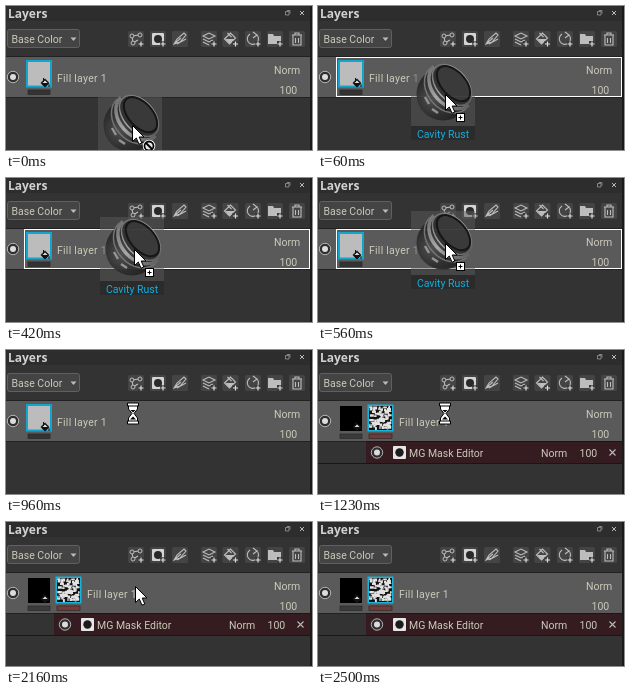
An HTML page for the animation above (2.89 s loop, 306 by 144 pixels).

```html
<!DOCTYPE html>
<html lang="en">
<head>
<meta charset="utf-8">
<title>Layers panel</title>
<style>
html, body { margin: 0; width: 100%; height: 100%; overflow: hidden; background: #333; }
svg { display: block; width: 100%; height: 100%; }
text { font: 10.5px Roboto, "Open Sans", sans-serif; fill: #cbc9ba; }
.title { font: bold 12px "Open Sans", "Noto Sans", sans-serif; fill: #d2d2d2; }
.name { letter-spacing: .25px; }
.drag { fill: #12aede; text-anchor: middle; }
.line { fill: none; stroke: #bdbdbd; stroke-width: 1.1; }
</style>
</head>
<body>
<svg viewBox="0 0 306 144">
  <defs>
    <radialGradient id="ball" cx=".3" cy=".6" r=".75">
      <stop offset="0" stop-color="#505050"/><stop offset=".45" stop-color="#2c2c2c"/><stop offset="1" stop-color="#171717"/>
    </radialGradient>
    <linearGradient id="rim">
      <stop offset="0" stop-color="#777"/><stop offset=".5" stop-color="#b0b0b0"/><stop offset="1" stop-color="#666"/>
    </linearGradient>
    <rect id="key" x="-8" y="-8" width="16" height="16" rx="1.5" fill="#444"/>
    <g id="plus">
      <rect x="2" y="2" width="6" height="6" fill="#3a3a3a"/>
      <path d="M5 2.5v5M2.5 5h5" stroke="#ddd" stroke-width="1.2"/>
    </g>
    <g id="eye">
      <circle r="5.7" fill="#2e2e2e" stroke="#b4b4b4"/>
      <circle r="3" fill="#dcdcdc"/>
    </g>
    <g id="bucket">
      <path d="M-3.5 0L0-3.5L3.5 0L0 3.5Z" fill="#ddd" stroke="#111" stroke-width="1.3"/>
      <path d="M-3 .5H3L0 3.5ZM-1.5-5V-1M4 1v3" fill="#111" stroke="#111"/>
    </g>
  </defs>

  <rect width="306" height="144" fill="#333"/>
  <rect width="306" height="15" fill="#2d2d2d"/>
  <text class="title" x="2" y="12">Layers</text>
  <path d="M279.5 5.5h3.5v3.5h-3.5zM281 4.5h3v3" fill="none" stroke="#999" stroke-width=".8"/>
  <path d="M294 5l4 4m0-4l-4 4" stroke="#bbb"/>

  <rect x="1.5" y="23.5" width="72" height="18" rx="2" fill="#444" stroke="#606060"/>
  <text x="5.5" y="36.5">Base Color</text>
  <path d="M64.5 31.5h6l-3 3.5z" fill="#bbb"/>

  <g id="tools" transform="translate(0 33)">
    <g transform="translate(130)">
      <use href="#key"/>
      <path class="line" d="M-4-3L3-4M-4-3L-3 4M-3 4L2 1"/>
      <g fill="#444" stroke="#bdbdbd"><circle cx="-4" cy="-3" r="2"/><circle cx="4" cy="-4" r="2"/><circle cx="-3" cy="4" r="2"/></g>
      <use href="#plus"/>
    </g>
    <g transform="translate(152)">
      <use href="#key"/>
      <rect x="-6" y="-6" width="12" height="12" rx="1" fill="#d4d4d4"/>
      <circle r="4" fill="#292929"/><use href="#plus"/>
    </g>
    <g transform="translate(174)">
      <use href="#key"/>
      <path class="line" d="M-6 5L-3 0L4-6L6-4L0 3ZM-3 5L6 0M-6 5L1-1"/>
    </g>
    <g transform="translate(203)">
      <use href="#key"/>
      <path class="line" d="M-6-3L0-6L6-3L0 0ZM-6 0L0 3L4 1M-6 3L0 6"/><use href="#plus"/>
    </g>
    <g transform="translate(224.5)">
      <use href="#key"/>
      <path class="line" d="M-6 0L0-6L5-1L-1 5ZM-3-6L1-2"/>
      <path d="M-5 0H4L-1 5Z" fill="#bdbdbd"/><use href="#plus"/>
    </g>
    <g transform="translate(247)">
      <use href="#key"/>
      <path class="line" d="M-3-5A5.6 5.6 0 1 0 4-4M0-7L4-4L0-1"/><use href="#plus"/>
    </g>
    <g transform="translate(269)">
      <use href="#key"/>
      <path d="M-7-5h5l1 2h7v8h-13z" fill="#bdbdbd"/><use href="#plus"/>
    </g>
    <g transform="translate(291)">
      <use href="#key"/>
      <path class="line" d="M-5-4H5M-2-4V-6H2V-4M-4-4V6H4V-4M-1.5-1V4M1.5-1V4"/>
    </g>
  </g>

  <rect y="50" width="306" height="1" fill="#222"/>
  <rect y="51" width="304" height="40" fill="#5a5a5a"/>
  <rect y="91" width="306" height="1" fill="#222"/>
  <use href="#eye" x="7" y="71"/>
  <text x="268" y="68">Norm</text>
  <text x="273.5" y="87.5">100</text>
  <text class="name" id="name" y="75.5">Fill layer 1</text>

  <g id="plain">
    <rect x="20" y="54" width="26" height="27.5" fill="#14a5cf"/>
    <rect x="22" y="56" width="22" height="23.5" fill="#bcbcbc"/>
    <use href="#bucket" x="39" y="77"/>
    <rect x="22" y="84" width="22" height="4.5" fill="#333" stroke="#2a2a2a" stroke-width=".7"/>
  </g>

  <g id="masked">
    <rect x="22" y="56" width="22" height="25" fill="#000"/>
    <use href="#bucket" x="39" y="77"/>
    <rect x="22" y="84" width="22" height="4.5" fill="#3b3b3b" stroke="#2a2a2a" stroke-width=".7"/>
    <rect x="49.5" y="54.5" width="26" height="27" fill="#14b4dc"/>
    <rect x="51" y="56" width="23" height="24" fill="#111"/>
    <path id="grunge" fill="#e2e2e2"/>
    <rect x="51" y="84" width="23" height="4.5" fill="#743a3a" stroke="#2a2a2a" stroke-width=".7"/>
    <rect y="92" width="304" height="21" fill="#333"/>
    <rect x="48" y="92" width="256" height="21" fill="#341c20"/>
    <path d="M0 113.5H304M48 91.5H304" stroke="#1c1416"/>
    <use href="#eye" x="59" y="102.5"/>
    <rect x="75" y="96" width="13" height="13" rx="1" fill="#e6e6e6"/>
    <circle cx="81.5" cy="102.5" r="4.2" fill="#1c1c1c"/>
    <text x="91" y="106.5">MG Mask Editor</text>
    <text x="223" y="106.5">Norm</text>
    <text x="261.5" y="106.5">100</text>
    <path d="M291.5 99.5l6 6m0-6l-6 6" stroke="#bbb" stroke-width="1.1"/>
  </g>

  <rect id="outline" x="18.5" y="51.5" width="285" height="39" fill="none" stroke="#fff"/>
  <rect x="304" width="2" height="144" fill="#1a1a1a"/>

  <g id="pointer">
    <g id="asset">
      <g transform="translate(-34 -32)">
        <rect width="64" height="64" fill="#5a5a5a" opacity=".5"/>
        <rect y="64" width="64" height="14" opacity=".15"/>
        <g opacity=".92">
          <circle cx="32" cy="32" r="26.5" fill="url(#ball)"/>
          <g transform="translate(41 23) rotate(48)" fill="none" stroke="url(#rim)">
            <path d="M-27 5A27 21 0 0 0 27 5" stroke="#777" stroke-width="1.5"/>
            <path d="M-26 1A26 19 0 0 0 26 1" stroke-width="3.5"/>
            <ellipse rx="24" ry="15" fill="#303030" stroke-width="1.5"/>
            <ellipse cy="-2" rx="21" ry="12" fill="#383838" stroke="#111" stroke-width="2"/>
          </g>
          <path d="M14 35l4 7M21 47l6 4" stroke="#999" stroke-width="2.5"/>
        </g>
      </g>
      <text class="drag" x="-2" y="43.5">Cavity Rust</text>
    </g>
    <path d="M.5.5V16.5L4.3 13L7 19.2L9.8 18L7.2 12H12Z" fill="#fff" stroke="#000"/>
    <g id="copy">
      <rect x="11.5" y="19.5" width="8" height="8" fill="#fff" stroke="#000"/>
      <path d="M15.5 21.5v4M13.5 23.5h4" stroke="#000"/>
    </g>
    <g id="deny" fill="none">
      <circle cx="17" cy="21" r="4.5" fill="#ddd" stroke="#fff" stroke-width="3.5"/>
      <circle cx="17" cy="21" r="4.5" stroke="#000" stroke-width="1.8"/>
      <path d="M14 18l6 6" stroke="#000" stroke-width="1.8"/>
    </g>
  </g>

  <g id="wait" transform="translate(127 63.5)">
    <path d="M-5.5-10.5h11v3h-1v3L1 0L4.5 4.5v3h1v3h-11v-3h1v-3L-1 0L-4.5-4.5v-3h-1z" fill="#fff" stroke="#000"/>
    <path d="M-5-7.5H5M-5 7.5H5" stroke="#000"/>
    <path d="M-2.5-3.5h5L0-1zM-3 6L0 3L3 6z" fill="#000"/>
  </g>
</svg>
<script>
const LOOP = 2890;
// time, pointer x, pointer y; the pose holds until the next entry
const poses = [
  [0, 126, 119], [60, 127, 88], [140, 128, 75], [230, 128, 74],
  [420, 128, 71], [490, 127, 68], [560, 127, 65], [960, 127, 63],
  [1320, 127, 63], [2160, 129, 64], [2250, 150, 78],
  [2330, 186, 103], [2420, 224, 124]
];
const DENIED = 60, DROP = 960, MASKED = 1230, READY = 1320, GONE = 2500;

const el = id => document.getElementById(id);
const show = (id, on) => el(id).setAttribute("display", on ? "inline" : "none");

// blotchy black and white texture inside the mask thumbnail
function grunge() {
  let seed = 17, d = "";
  const rand = () => (seed = seed * 16807 % 2147483647) / 2147483647;
  for (let i = 0; i < 110; i++) {
    const w = 1 + 3 * rand(), h = 1 + 2 * rand();
    const x = 51 + (23 - w) * rand(), y = 56 + (24 - h) * rand();
    d += `M${x} ${y}h${w}v${h}h${-w}z`;
  }
  return d;
}

function draw(t) {
  const [, x, y] = poses.filter(p => p[0] <= t).pop();
  const dragging = t < DROP, masked = t >= MASKED;
  el("pointer").setAttribute("transform", `translate(${x} ${y})`);
  el("name").setAttribute("x", masked ? 81 : 51);
  show("pointer", dragging || (t >= READY && t < GONE));
  show("asset", dragging);
  show("deny", t < DENIED);
  show("copy", dragging && t >= DENIED);
  show("outline", dragging && t >= DENIED);
  show("wait", t >= DROP && t < READY);
  show("plain", !masked);
  show("masked", masked);
}

el("grunge").setAttribute("d", grunge());
const start = performance.now();
function tick() {
  draw((performance.now() - start) % LOOP);
  requestAnimationFrame(tick);
}
tick();
</script>
</body>
</html>
```
